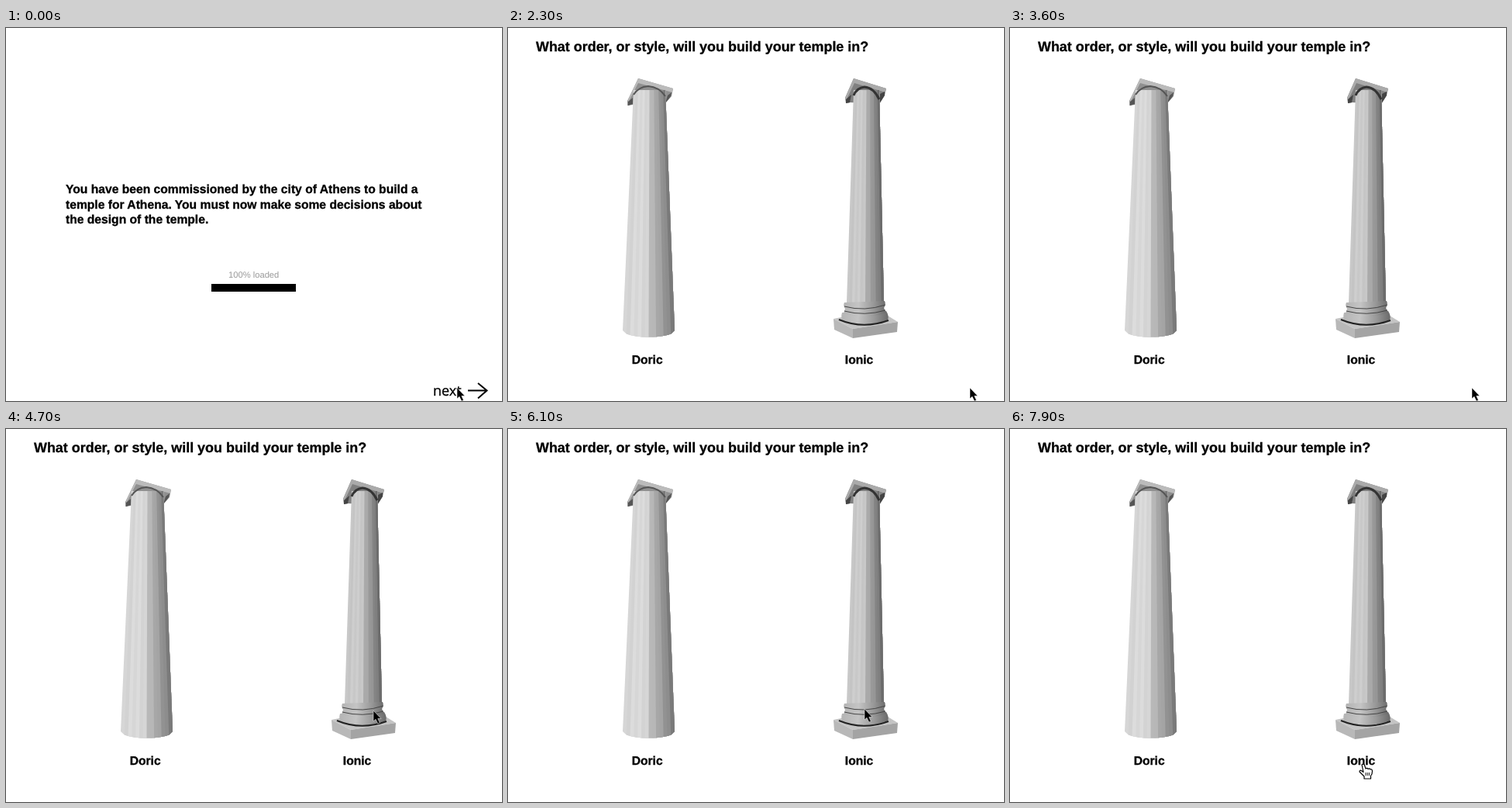
Recreate the animation shown at these times as an HTML page. Size 640x481 px, loop 8000 ms.

```html
<!DOCTYPE html>
<html lang="en">
<head>
<meta charset="utf-8">
<title>Build a temple</title>
<style>
  html, body { margin: 0; width: 100%; height: 100%; overflow: hidden; background: #fff; }
  svg { display: block; width: 640px; height: 481px; }
  text { font: bold 15.65px "Liberation Sans", Arial, sans-serif; text-rendering: geometricPrecision; stroke: #000; stroke-width: .3; }
  .title { font-size: 17.93px; }
  .loaded { font-weight: normal; font-size: 11.2px; fill: #999; stroke: none; }
  .next { font: 18px "Open Sans", sans-serif; }
</style>
</head>
<body>
<svg viewBox="0 0 640 481">
  <defs>
    <linearGradient id="stone">
      <stop offset="0" stop-color="#b4b4b4"/>
      <stop offset=".35" stop-color="#c4c4c4"/>
      <stop offset=".7" stop-color="#999"/>
      <stop offset="1" stop-color="#6a6a6a"/>
    </linearGradient>
  </defs>

  <g id="intro">
    <text x="77" y="213">You have been commissioned by the city of Athens to build a</text>
    <text x="77" y="233">temple for Athena. You must now make some decisions about</text>
    <text x="77" y="252">the design of the temple.</text>
    <text class="loaded" x="287" y="322">100% loaded</text>
    <rect x="265" y="330" width="109" height="10"/>
    <text class="next" x="551" y="474">next</text>
    <path d="M596 467.5H620M609 458L620.5 467.5L609 477.5" fill="none" stroke="#000" stroke-width="2"/>
  </g>

  <g id="choice">
    <text class="title" x="36" y="30">What order, or style, will you build your temple in?</text>
    <text x="159.7" y="433">Doric</text>
    <text x="434.8" y="433">Ionic</text>

    <!-- Doric capital and shaft -->
    <path d="M168 65L213 78L211 88L203 97L161 99L154 100V94Z" fill="#909090"/>
    <path d="M168 65L213 78L212 83L168 71L155 96V93Z" fill="#bbb"/>
    <path d="M155 95L161 90V98L155 100ZM206 87L211 83L210 88L203 97Z" fill="#555"/>
    <g id="doric"></g>
    <path d="M162 86Q168 76 181 75Q195 76 203 88" fill="none" stroke="#555" stroke-width="2"/>

    <!-- Ionic capital, shaft and base -->
    <path d="M446 65L488 78L486 87L479 98L442 96L436 97L435 90Z" fill="#808080"/>
    <path d="M446 65L488 78L487 83L447 71L436 94L435 90Z" fill="#aaa"/>
    <path d="M436 92L443 86L441 96L436 97ZM480 85L486 82V87L479 98Z" fill="#444"/>
    <g id="ionic"></g>
    <path d="M446 87Q450 77 460 76Q472 77 479 92" fill="none" stroke="#333" stroke-width="3"/>
    <path d="M420 375L440 371H490L503 379L445 388Z" fill="#c4c4c4"/>
    <path d="M420 375L445 388V400L421 389Z" fill="#b8b8b8"/>
    <path d="M445 388L503 379L502 392L445 400Z" fill="#a4a4a4"/>
    <path d="M431 367Q429 374 432 378Q460 389 490 377Q492 371 488 365Z" fill="url(#stone)"/>
    <path d="M434 354Q432 358 435 362L433 368Q461 378 488 367L485 361Q488 356 486 352Z" fill="url(#stone)"/>
    <g fill="none" stroke="#444">
      <path d="M434 359Q460 366 487 357M434 365Q460 372 487 364"/>
      <path d="M427 376Q458 389 491 377" stroke="#222" stroke-width="2"/>
    </g>
  </g>

  <g id="cursor">
    <path id="arrow" d="M0 0V14L3 11.3L5.8 17L8.4 16L5.8 10.5H10Z" stroke="#fff" stroke-width=".5"/>
    <g id="hand" fill="#fff" stroke="#000" stroke-width="1.2" stroke-linejoin="round">
      <path d="M-1 1Q1 -1 2.5 1.5L4 6Q6 4.5 7 6.5Q9 5 10 7Q12 6 12.5 9L12 13L10.5 15V19H2V16L-4 10Q-4 7 -1 9L1 10.5Z"/>
      <path d="M4 11V15M6.2 11V15M8.4 11V15" stroke-width=".9"/>
    </g>
  </g>
</svg>

<script>
const LOOP = 8000, STEP = 100, CHOICE_AT = 2000, LABEL_TOP = 416;
const byId = id => document.getElementById(id);
const mix = (a, b, k) => a + (b - a) * k;

// Tapered shaft of flat flutes; each strip reaches the right edge and the next one covers it.
function drawShaft(id, top, bottom, flutes, tone) {
  const sag = u => bottom.y + bottom.sag * 2 * Math.sqrt(u * (1 - u));
  let strips = "";
  for (let i = 0; i < flutes; i++) {
    const u = i / flutes, middle = u + .5 / flutes;
    const shadow = middle > .48 ? 18 : 0;
    const light = tone + 14 * Math.sin(middle * 4) - 60 * middle ** 2.2 - shadow - (i % 2) * 7;
    const edge = [];
    for (let j = i; j <= flutes; j++) {
      const v = j / flutes;
      edge.push(`${mix(bottom.left, bottom.right, v)},${sag(v)}`);
    }
    strips += `<polygon fill="rgb(${light} ${light} ${light})" points="${mix(top.left, top.right, u)},${top.y}
      ${edge.join(" ")} ${top.right},${top.y}"/>`;
  }
  byId(id).innerHTML = strips;
}

drawShaft("doric", { left: 162, right: 203, y: 80 }, { left: 148, right: 215, y: 390, sag: 8.5 }, 14, 212);
drawShaft("ionic", { left: 446, right: 479, y: 80 }, { left: 437, right: 485, y: 354, sag: 5 }, 14, 198);

// Pointer path: time, x, y
const path = [
  [0, 582, 464], [400, 577, 464], [800, 577, 464], [1300, 596, 464],
  [4200, 596, 464], [4700, 474, 363],
  [5100, 463, 352], [5600, 460, 350], [6000, 460, 353], [6400, 461, 384],
  [6700, 461, 390], [7300, 455, 431], [7900, 455, 432], [LOOP, 455, 432]
];

function pointerAt(time) {
  const next = path.findIndex(key => key[0] > time);
  const [t0, x0, y0] = path[next - 1], [t1, x1, y1] = path[next];
  const k = (time - t0) / (t1 - t0);
  return [Math.round(mix(x0, x1, k)), Math.round(mix(y0, y1, k))];
}

const show = (id, visible) => byId(id).style.display = visible ? "" : "none";
const start = performance.now();

function render() {
  const elapsed = (performance.now() - start) % LOOP;
  const time = Math.floor(elapsed / STEP) * STEP;
  const [x, y] = pointerAt(time);
  const choosing = time >= CHOICE_AT;
  const overLabel = choosing && x < 500 && y >= LABEL_TOP;
  show("intro", !choosing);
  show("choice", choosing);
  show("hand", overLabel);
  show("arrow", !overLabel);
  byId("cursor").setAttribute("transform", `translate(${x} ${y})`);
  requestAnimationFrame(render);
}
render();
</script>
</body>
</html>
```
